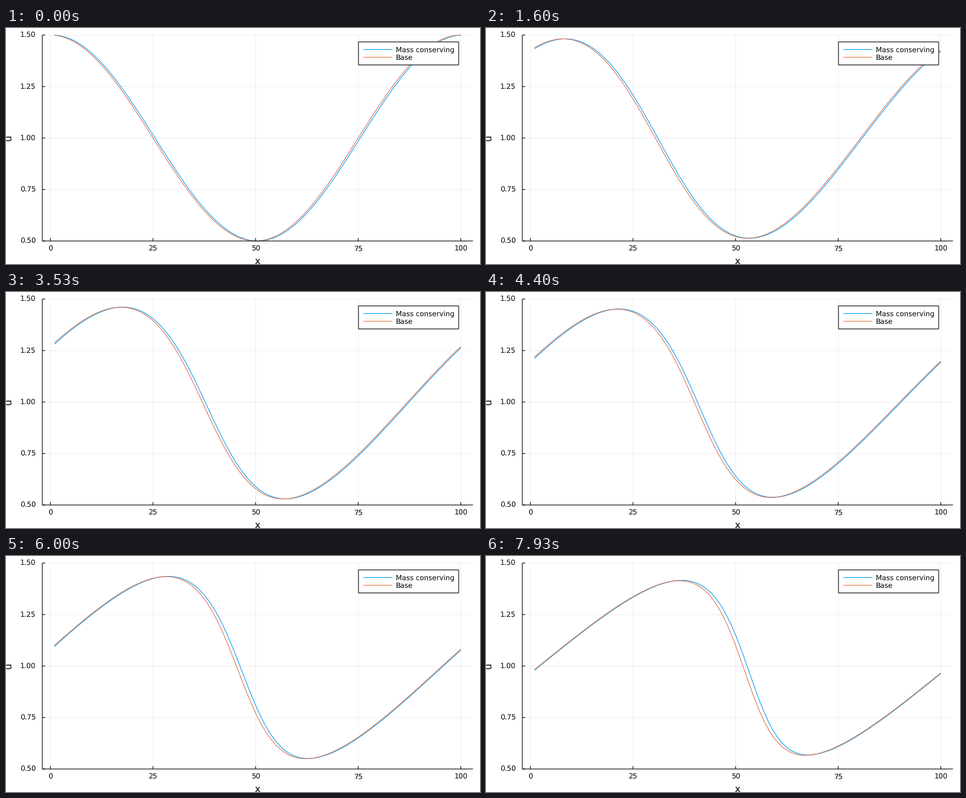
Write a matplotlib script that moves like this. It is 800 px wide and 400 px high and loops after 8000 ms.

```python
import numpy as np
import matplotlib.pyplot as plt
from matplotlib.animation import FuncAnimation
from matplotlib.patches import Rectangle

W, H, DPI = 800, 400, 100
PT = 72 / DPI                      # points per pixel
STEPS, LOOP = 120, 8000
TICK_MS, LEAD_MS = 20, 15          # clock tick; a step may start up to LEAD_MS early
BLUE, ORANGE = "#009AFA", "#E36F47"

# Burgers equation on a periodic grid
N = 100
DX = 1 / N
DT = 1 / 440
NU = 0.01
cells = np.arange(1, N + 1)


def wave(x):
    return 1 + 0.5 * np.cos(2 * np.pi * x)


def diffusion(u):
    return NU * (np.roll(u, -1) - 2 * u + np.roll(u, 1)) / DX**2


def conserving(u):
    flux = u**2 / 2
    return diffusion(u) - (flux - np.roll(flux, 1)) / DX


def advective(u):
    return diffusion(u) - u * (u - np.roll(u, 1)) / DX


def solve(rate, u):
    """Runge-Kutta states, one per step."""
    states = [u]
    for _ in range(STEPS - 1):
        a = rate(u)
        b = rate(u + DT / 2 * a)
        c = rate(u + DT / 2 * b)
        d = rate(u + DT * c)
        u = u + DT / 6 * (a + 2 * b + 2 * c + d)
        states.append(u)
    return states


mass = solve(conserving, wave((cells - 0.5) * DX))
base = solve(advective, wave(cells * DX))


# Data to stage pixels, y pointing down
def px(x):
    return 74.9 + 6.927 * x


def py(u):
    return 361 - 349 * (u - 0.5)


plt.rcParams.update({"font.family": "DejaVu Sans", "path.snap": False,
                     "text.hinting": "none"})
fig = plt.figure(figsize=(W / DPI, H / DPI), dpi=DPI, facecolor="white")
ax = fig.add_axes([0, 0, 1, 1])
ax.set_xlim(0, W)
ax.set_ylim(H, 0)
ax.axis("off")


def line(xs, ys, color="black", width=1.1, **kw):
    return ax.plot(xs, ys, color=color, lw=width * PT,
                   solid_capstyle="butt", **kw)[0]


def label(x, y, text, size=11.9, **kw):
    ax.text(x, y, text, fontsize=size * PT, va="baseline", **kw)


LEFT, RIGHT, TOP, BOTTOM = px(-1.97), px(102.97), py(1.5), py(0.5)
MARK = 5

for x in range(0, 101, 25):
    line([px(x)] * 2, [TOP, BOTTOM], alpha=0.07, width=1, zorder=1)
    line([px(x)] * 2, [BOTTOM, BOTTOM - MARK], zorder=4)
    label(px(x), 378.3, str(x), ha="center")

for u in np.linspace(0.5, 1.5, 5):
    line([LEFT, RIGHT], [py(u)] * 2, alpha=0.07, width=1, zorder=1)
    line([LEFT, LEFT + MARK], [py(u)] * 2, zorder=4)
    label(50.3, py(u) + 4.3, f"{u:.2f}", ha="right")

line([LEFT, RIGHT], [BOTTOM] * 2, zorder=4)
line([LEFT] * 2, [TOP, BOTTOM], zorder=4)
label(424.7, 399.6, "x", 16.3, ha="center")
label(9, 185.7, "u", 16.3, ha="center", rotation=90, rotation_mode="anchor")

mass_line = line(px(cells), py(mass[0]), BLUE, zorder=3)
base_line = line(px(cells), py(base[0]), ORANGE, zorder=3)

# Legend: three rows of 13 px
KEY_TOP, ROW = 23.6, 13
ax.add_patch(Rectangle((594.9, KEY_TOP), 169.1, 3 * ROW, fc="white",
                       ec="black", lw=1.1 * PT, zorder=5))
for i, (color, name) in enumerate(((BLUE, "Mass conserving"), (ORANGE, "Base"))):
    y = KEY_TOP + (i + 1) * ROW
    line([603, 652], [y, y], color, zorder=6)
    label(658, y + 4.3, name, zorder=6)


def update(tick):
    i = int((tick * TICK_MS + LEAD_MS) * STEPS / LOOP)
    mass_line.set_ydata(py(mass[i]))
    base_line.set_ydata(py(base[i]))
    return mass_line, base_line


anim = FuncAnimation(fig, update, frames=LOOP // TICK_MS, interval=TICK_MS,
                     repeat=True, repeat_delay=0, blit=False)
plt.show()
```
